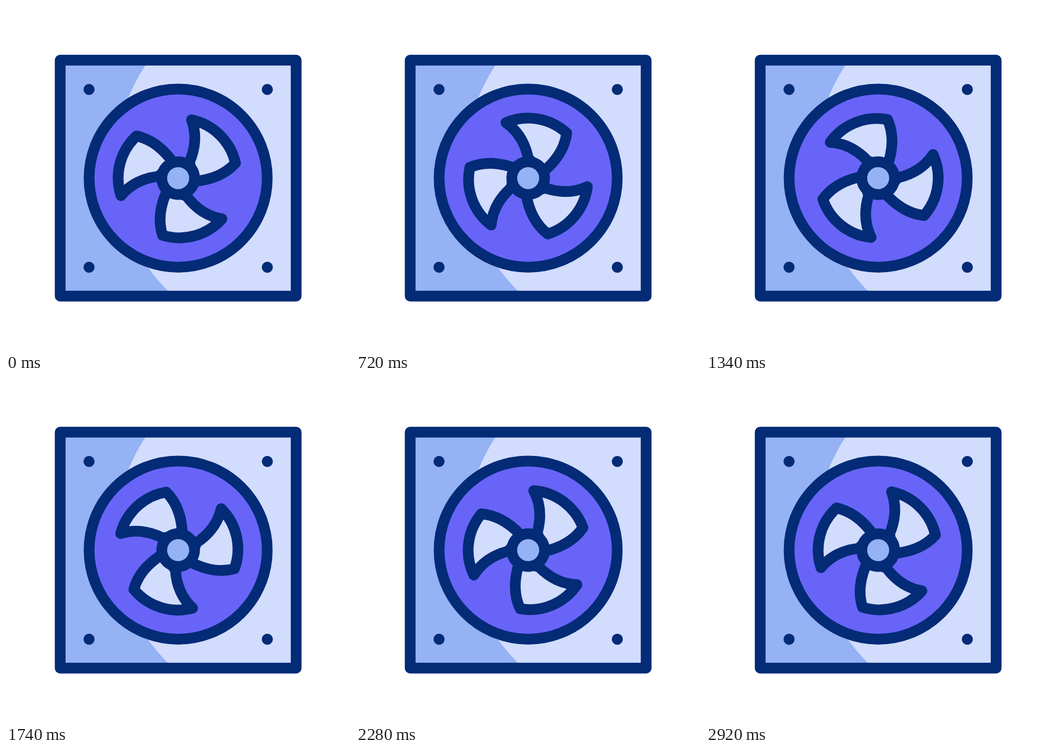
Animation of 640x640 px, one loop 3040 ms. Source, as an HTML page:

```html
<!DOCTYPE html>
<html lang="en">
<head>
<meta charset="utf-8">
<title>Fan</title>
<style>
  html, body { margin: 0; height: 100%; overflow: hidden; background: #fff; }
  svg { display: block; width: 100vw; height: 100vh; }
  .line { stroke: #032b76; stroke-width: 20; stroke-linejoin: round; }
</style>
</head>
<body>
<svg viewBox="0 0 640 640">
  <defs>
    <path id="blade" class="line" fill="#d2dcfd"
      d="M341.5 290Q359 248.7 345.2 211.8A106 106 0 0 1 426.9 292.2Q400 322.4 348 326.7Z"/>
  </defs>
  <rect x="100.8" y="100.8" width="439" height="439" fill="#d2dcfd"/>
  <path d="M101 101H265L259 111A333 333 0 0 0 301 530L311 539H101Z" fill="#94b2f4"/>
  <rect class="line" x="100.8" y="100.8" width="439" height="439" fill="none"/>
  <g fill="#032b76">
    <circle cx="154.5" cy="155.3" r="10.3"/>
    <circle cx="486.2" cy="155.3" r="10.3"/>
    <circle cx="154.5" cy="486" r="10.3"/>
    <circle cx="486.2" cy="486" r="10.3"/>
  </g>
  <circle class="line" cx="320.3" cy="320.2" r="165.7" fill="#6864f8"/>
  <g id="fan">
    <use href="#blade"/>
    <use href="#blade" transform="rotate(120 320.3 320.2)"/>
    <use href="#blade" transform="rotate(240 320.3 320.2)"/>
    <circle class="line" cx="320.3" cy="320.2" r="30.5" fill="#94b2f4"/>
  </g>
</svg>
<script>
  const LOOP = 3040, STEP = 20;
  // Six turns, easing in and out: [ms, degrees]
  const keys = [[250, 0], [460, 52.4], [1020, 460], [1340, 773.8],
                [1740, 1233.1], [2280, 1792.4], [2920, 2160]];
  const fan = document.getElementById('fan');

  const slope = i => (keys[i + 1][1] - keys[i][1]) / (keys[i + 1][0] - keys[i][0]);

  // Speed at a key, weighted by the neighbouring spans; at rest at both ends
  function speed(i) {
    if (i === 0 || i === keys.length - 1) return 0;
    const before = keys[i][0] - keys[i - 1][0];
    const after = keys[i + 1][0] - keys[i][0];
    return (slope(i - 1) * after + slope(i) * before) / (before + after);
  }

  function angleAt(t) {
    const last = keys.length - 1;
    if (t <= keys[0][0] || t >= keys[last][0]) return 0;
    const i = keys.findIndex(key => key[0] > t) - 1;
    const [t0, a0] = keys[i], [t1, a1] = keys[i + 1];
    const span = t1 - t0, u = (t - t0) / span, v = 1 - u;
    return a0 * v * v * (1 + 2 * u) + a1 * u * u * (3 - 2 * u)
      + span * u * v * (speed(i) * v - speed(i + 1) * u);
  }

  function draw() {
    const t = Math.floor(performance.now() % LOOP / STEP) * STEP;
    fan.setAttribute('transform', `rotate(${angleAt(t)} 320.3 320.2)`);
    requestAnimationFrame(draw);
  }
  draw();
</script>
</body>
</html>
```
